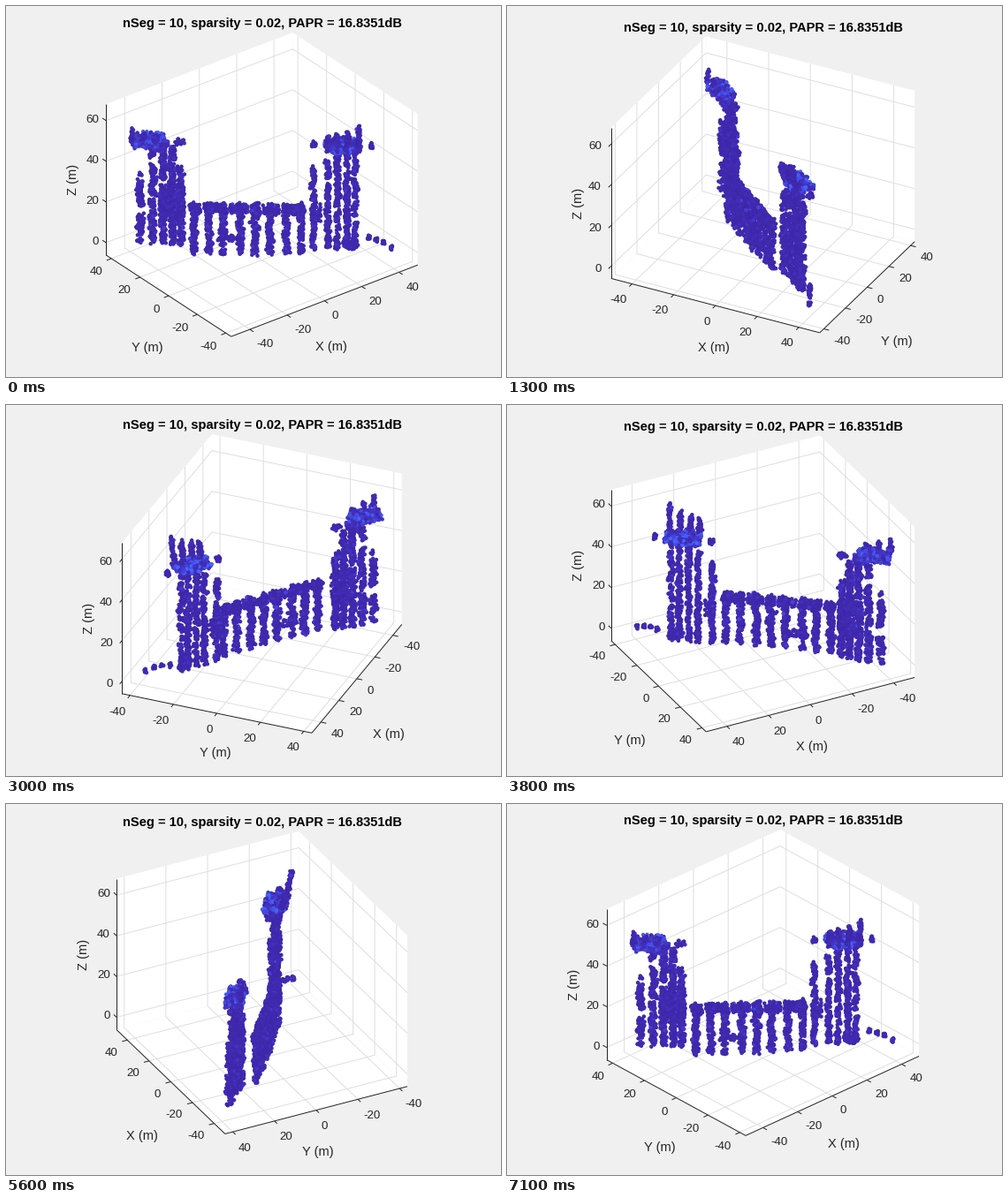
These frames come from a looping animation (560 px wide and 420 px high, 7.2 s). A matplotlib script:

```python
import numpy as np
import matplotlib.pyplot as plt
from matplotlib.animation import FuncAnimation
from matplotlib.collections import LineCollection, PolyCollection

plt.rcParams["font.family"] = "Liberation Sans"

W, H, DPI = 560, 420, 100
PX = 72 / DPI                       # points per pixel
FRAMES, STEP, AZ0 = 72, 5, -37.5
SCALE = 2.66                        # pixels per metre
SIN_EL, COS_EL = 0.5, np.sqrt(3) / 2
XL, YL, Z0, Z1 = 50, 43.7, -6.1, 68.1
CENTRE, FLOOR = 289.5, 287.6
TICK = 2.5
INK, GRID = "#262626", "#dfdfdf"
XY_TICKS = range(-40, 41, 20)
Z_TICKS = range(0, 61, 20)

rng = np.random.default_rng(7)


# ---------- point cloud: a = along the bridge, b = across it, z = up ----------

def blob(a, b, z, sa, sb, sz, n, glow=0.0):
    """A box of points with soft edges, plus a brightness for each."""
    p = np.array([a, b, z]) + rng.uniform(-1, 1, (n, 3)) * [sa, sb, sz]
    p += rng.normal(0, 0.15, (n, 3))
    v = rng.exponential(0.1, n) + glow * rng.random(n) ** 2
    return np.column_stack([p, v])


def column(a, b, low, high, keep=1.0, n=9, width=1.0):
    """Stacked lumps; keep is the share of lumps that are present."""
    lumps = []
    for z in np.arange(low, high, 1.9):
        if rng.random() < keep:
            shift = rng.normal(0, 0.3, 2)
            lumps.append(blob(a + shift[0], b + shift[1], z + 0.9,
                              width, 1.1, 1.1, n))
    return np.vstack(lumps)


def deck_b(a):
    return -3.2 - 0.025 * a


def make_cloud():
    parts = []

    # bridge columns, deck pieces and one low cross piece
    for a in (-28.8, -22.4, -16.4, -9.2, -2.8, 3.6, 10.3, 16.7):
        parts.append(column(a, deck_b(a), -1.3, 21.5, 0.97, 10, 1.15))
    for a, half in ((-28.6, 2.4), (-20, 4.5), (-9.8, 3.8), (-2.8, 2),
                    (4, 3.3), (12, 3), (16, 2.3)):
        parts.append(blob(a, deck_b(a), 20.8, half, 1.4, 2, int(20 * half)))
    parts.append(blob(-13, deck_b(-13), 6.3, 5, 1, 1.3, 50))

    # left tower
    for a, b, high, keep in ((-51.7, 5, 29, 0.8), (-46.4, 4.5, 46, 0.9),
                             (-41.9, 4, 48, 0.97), (-38, 3.5, 46, 0.97),
                             (-34.4, 3, 38, 0.95)):
        parts.append(column(a, b, 0, high, keep, 10, 1.2))
    parts.append(blob(-51.5, 4.5, 34, 0.6, 0.6, 1, 6))
    parts.append(blob(-39, 3.5, 20, 4.5, 1.6, 9, 150))
    parts.append(blob(-48.5, 2.6, 51.5, 7.2, 4, 2, 240, 0.9))
    parts.append(blob(-43, 3, 48.5, 3.5, 2, 2, 60, 0.5))
    parts.append(blob(-35, 3, 50.2, 2, 1, 1, 22))
    for a, high in ((-55, 58.5), (-50, 57), (-45, 55.5)):
        parts.append(blob(a, 0, (high + 52) / 2, 0.8, 0.8, (high - 52) / 2, 18))

    # right tower
    for a, high, keep in ((22, 38, 0.95), (28, 47, 0.86), (32.1, 48, 0.86),
                          (36.3, 48, 0.86), (39.7, 47, 0.86)):
        parts.append(column(a, 0.025 * (a - 40), -0.5, high, keep, 9, 0.9))
    parts.append(blob(23, -0.3, 17, 2, 1.2, 4, 40))
    parts.append(blob(37.5, 0, 2, 3, 1.2, 2, 40))
    parts.append(blob(34.5, 0, 50.3, 7.6, 4.8, 1.6, 290, 1.2))
    parts.append(blob(34, 0, 47.8, 5, 2.5, 1.2, 60, 0.6))
    parts.append(blob(22.3, 1, 50, 1.2, 1.2, 0.9, 16))
    parts.append(blob(46.6, 0.5, 50, 0.7, 1.2, 1, 12))
    for a, high in ((28, 57), (32, 58), (36.5, 59.5), (41, 62.5)):
        z = np.linspace(50, high, 11)
        for h in z:
            parts.append(blob(a, -3.4 - 0.18 * (h - 50), h, 0.7, 0.7, 0.5, 4))

    # low outliers to the right
    for a, b, z in ((45.7, 1, 4.6), (48.7, -0.8, 4.4),
                    (51.7, -2, 3.8), (55, -4, 2)):
        parts.append(blob(a, b, z, 0.5, 0.6, 0.7, 9))

    cloud = np.vstack(parts)
    a, b, z, v = cloud.T
    t = np.radians(AZ0)
    x = a * np.cos(t) - b * np.sin(t)
    y = a * np.sin(t) + b * np.cos(t)
    shades = np.array([[62, 38, 168], [69, 58, 206], [68, 100, 252]]) / 255
    rgb = np.column_stack([np.interp(v, [0, 0.5, 1.1], s) for s in shades.T])
    return np.column_stack([x, y, z]), rgb


points, colours = make_cloud()


# ---------- stage ----------

fig = plt.figure(figsize=(W / DPI, H / DPI), dpi=DPI, facecolor="#f0f0f0")
ax = fig.add_axes([0, 0, 1, 1])
ax.set_xlim(0, W)
ax.set_ylim(H, 0)
ax.axis("off")

walls = ax.add_collection(PolyCollection([], facecolors="white", edgecolors="none"))
grid = ax.add_collection(LineCollection([], colors=GRID, linewidths=PX))
frame = ax.add_collection(LineCollection([], colors=INK, linewidths=PX))
dots = ax.scatter(points[:, 0], points[:, 1], s=(4.5 * PX) ** 2,
                  c=colours, linewidths=0)
walls.set_zorder(1)
grid.set_zorder(2)
frame.set_zorder(3)
dots.set_zorder(4)


def label(text, px, **kw):
    kw = {"ha": "center", "color": INK, **kw}
    return ax.text(0, 0, text, fontsize=px * PX, va="baseline", zorder=5, **kw)


def place(text, x, y):
    """Centre the capitals vertically on y."""
    text.set_position((x, y + 0.36 * text.get_fontsize() / PX))


x_nums = [label(str(v), 13.33) for v in XY_TICKS]
y_nums = [label(str(v), 13.33) for v in XY_TICKS]
z_nums = [label(str(v), 13.33, ha="right") for v in Z_TICKS]
x_name = label("X (m)", 14.67)
y_name = label("Y (m)", 14.67)
z_name = label("Z (m)", 14.67, rotation=90, rotation_mode="anchor")
title = label("nSeg = 10, sparsity = 0.02, PAPR = 16.8351dB", 14.67,
              color="black", weight="bold")


def project(p, c, s):
    """World points to stage pixels."""
    x, y, z = np.moveaxis(np.asarray(p, float), -1, 0)
    right, depth = x * c + y * s, y * c - x * s
    return np.stack([CENTRE + SCALE * right,
                     FLOOR - SCALE * (SIN_EL * depth + COS_EL * (z - Z0))], -1)


def put_numbers(nums, ends, way):
    ux, uy = way / np.hypot(*way)
    side = np.sign(ux)
    for num, (x, y) in zip(nums, ends):
        num.set_ha("left" if side > 0 else "right")
        place(num, x + side * max(0.5, 10 * abs(ux) - 4.5), y + 9.5 + 6 * uy)


def put_name(name, middle, way):
    h = abs(way[0]) / (SCALE * TICK)
    dx = max(2, 92 * (h - 0.53))
    place(name, middle[0] + np.sign(way[0]) * dx,
          middle[1] + 44 + 33 * (h - 0.383))


def draw(k):
    az = np.radians(AZ0 + STEP * k)
    c, s = np.cos(az), np.sin(az)
    sc, ss = np.sign(c), np.sign(s)
    xf, yf = ss * XL, -sc * YL              # front corner
    xl, yl = -sc * XL, -ss * YL             # left corner

    def to_px(p):
        return project(p, c, s)

    walls.set_verts([to_px(q) for q in (
        [(-XL, -YL, Z0), (XL, -YL, Z0), (XL, YL, Z0), (-XL, YL, Z0)],
        [(-xf, -YL, Z0), (-xf, YL, Z0), (-xf, YL, Z1), (-xf, -YL, Z1)],
        [(-XL, -yf, Z0), (XL, -yf, Z0), (XL, -yf, Z1), (-XL, -yf, Z1)])])

    lines = []
    for v in XY_TICKS:
        lines.append([(v, yf, Z0), (v, -yf, Z0), (v, -yf, Z1)])
        lines.append([(xf, v, Z0), (-xf, v, Z0), (-xf, v, Z1)])
    for v in Z_TICKS:
        lines.append([(xf, -yf, v), (-xf, -yf, v), (-xf, yf, v)])
    grid.set_segments([to_px(q) for q in lines])

    # ticks point outward; the z ones take the more steeply drawn direction
    x_way = np.array([0, np.sign(yf), 0]) * TICK
    y_way = np.array([np.sign(xf), 0, 0]) * TICK
    z_way = np.array([np.sign(xl), 0, 0] if abs(c) < abs(s)
                     else [0, np.sign(yl), 0]) * TICK
    edges = [[(-XL, yf, Z0), (XL, yf, Z0)],
             [(xf, -YL, Z0), (xf, YL, Z0)],
             [(xl, yl, Z0), (xl, yl, Z1)]]
    starts = [[(v, yf, Z0) for v in XY_TICKS],
              [(xf, v, Z0) for v in XY_TICKS],
              [(xl, yl, v) for v in Z_TICKS]]
    segments = [to_px(e) for e in edges]
    middles = [e.mean(axis=0) for e in segments]
    ends, ways = [], []
    for start, way in zip(starts, (x_way, y_way, z_way)):
        p, q = to_px(start), to_px(np.array(start) + way)
        segments += list(np.stack([p, q], axis=1))
        ends.append(q)
        ways.append(q[0] - p[0])
    frame.set_segments(segments)

    put_numbers(x_nums, ends[0], ways[0])
    put_numbers(y_nums, ends[1], ways[1])
    put_name(x_name, middles[0], ways[0])
    put_name(y_name, middles[1], ways[1])
    down = ways[2][1] > 0
    for num, (x, y) in zip(z_nums, ends[2]):
        place(num, x - (8 if down else 4), y - (1.5 if down else 0))
    z_name.set_position((middles[2][0] - 33.3, middles[2][1]))
    place(title, CENTRE + 0.5, to_px((-xf, -yf, Z1))[1] - 11)

    near = SIN_EL * points[:, 2] - COS_EL * (points[:, 1] * c - points[:, 0] * s)
    order = np.argsort(near)
    dots.set_offsets(to_px(points[order]))
    dots.set_facecolors(colours[order])
    return []


anim = FuncAnimation(fig, draw, frames=FRAMES, interval=100,
                     init_func=lambda: draw(0), repeat=True, repeat_delay=0)
plt.show()
```
